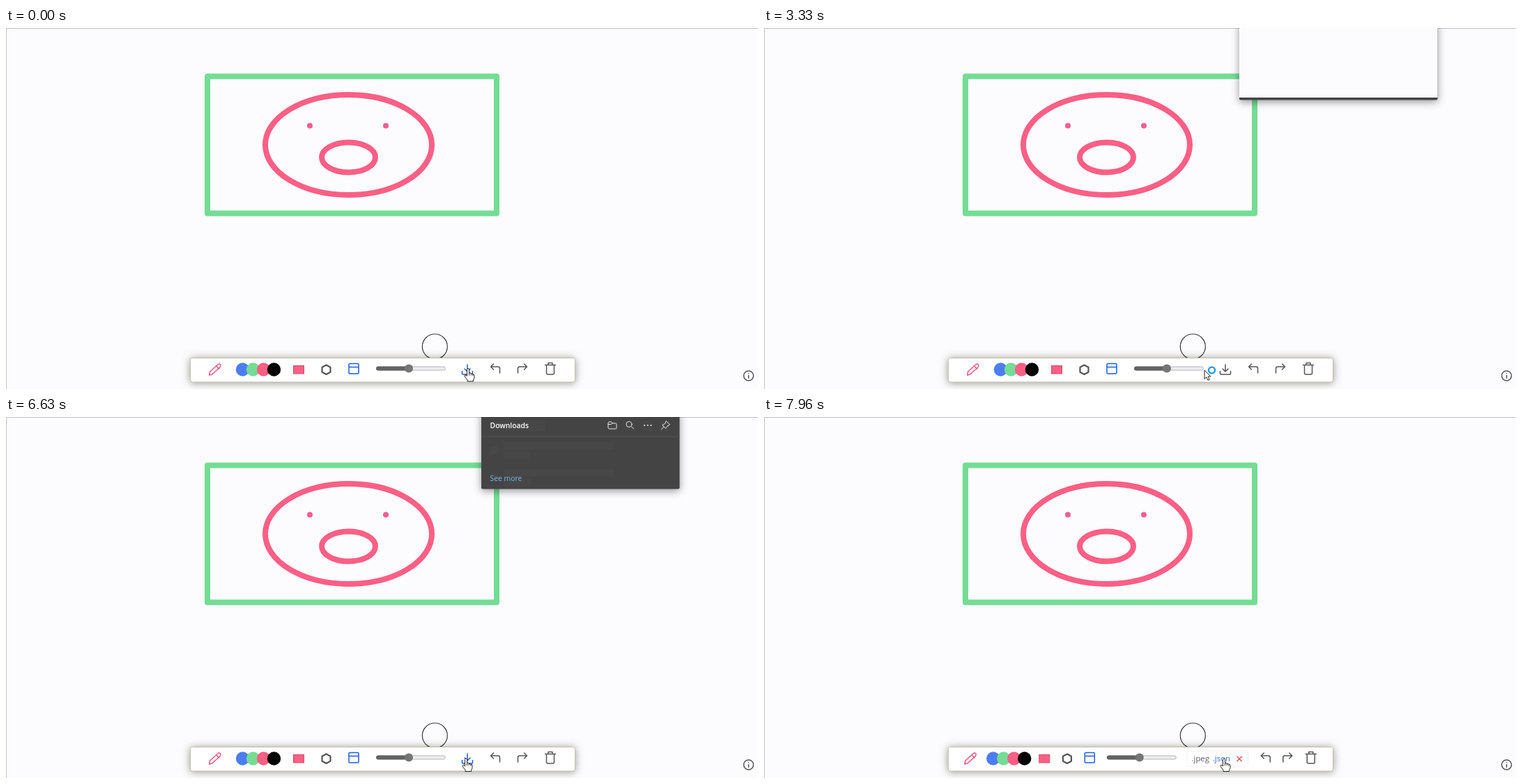
An HTML page that plays this animation: 1079x519 px, repeating every 8 s.

```html
<!DOCTYPE html>
<html lang="en">
<head>
<meta charset="utf-8">
<title>Drawing board export</title>
<style>
  html, body { margin: 0; width: 100%; height: 100%; overflow: hidden; background: #fcfcfe; }
  svg { display: block; font-family: "Open Sans", "Noto Sans", sans-serif; }
  .line { fill: none; stroke: #555; stroke-width: 1.5; stroke-linecap: round; stroke-linejoin: round; }
  .pink { stroke: #f4537c; }
  .blue { stroke: #1a5fe0; }
  .pale { stroke: #e8e8e8; stroke-width: 1; }
  .draw { fill: none; stroke: #fb5f85; stroke-width: 8; stroke-linejoin: round; }
  #bar { filter: drop-shadow(0 1px 6px rgba(50, 50, 30, .5)); }
  #sheet { filter: drop-shadow(0 3px 6px rgba(0, 0, 0, .4)); }
  .format { font-size: 12.2px; }
  .file { font-size: 9.1px; fill: #fff; }
  .open { font-size: 7.6px; fill: #76b9ed; }
</style>
</head>
<body>
<svg width="1079" height="519" viewBox="0 0 1079 519">
  <path d="M0 .5H1079" stroke="#bcbcd4"/>
  <path d="M.5 0V519" stroke="#c4c4bc"/>

  <rect class="draw" x="289" y="69.5" width="415" height="197" style="stroke:#74dc94"/>
  <ellipse class="draw" cx="491.5" cy="168" rx="119.5" ry="72"/>
  <ellipse class="draw" cx="491.5" cy="186" rx="38.5" ry="21.5"/>
  <g fill="#f45f90"><circle cx="436" cy="140.5" r="4"/><circle cx="545" cy="140.5" r="4"/></g>
  <circle cx="615.3" cy="458" r="18" fill="none" stroke="#3c3c46" stroke-width="1.2"/>
  <g class="line">
    <circle cx="1065.5" cy="500" r="7"/>
    <path d="M1065.5 499.5V503.5M1065.5 496.5V496.6"/>
  </g>

  <rect id="bar" x="264.5" y="474.5" width="552" height="34.5" rx="3" fill="#fff" stroke="#c2c2ae"/>
  <g id="tools">
    <path class="line pink" d="M-8 8L-7 3L4-7Q6-9 8-7Q9-5 7-3L-4 7ZM2-5L6-1"/>
    <g id="colors"></g>
    <rect x="-7.5" y="-5.5" width="15" height="11.5" fill="#fb5f85" stroke="#c9506d"/>
    <path class="line" style="stroke-width:2.2" d="M0-6.5L6-3.2V3.7L0 7L-6 3.7V-3.2Z"/>
    <path class="line blue" d="M-5.5-8.5H5.5Q7-8.5 7-7V4.5Q7 6 5.5 6H-5.5Q-7 6-7 4.5V-7Q-7-8.5-5.5-8.5ZM-7-3.5H7"/>
    <g>
      <rect x="-49.5" y="-4" width="99" height="5" rx="2.5" fill="#ededf0" stroke="#b6b6b6"/>
      <rect x="-50" y="-4.5" width="48" height="6" rx="3" fill="#626262"/>
      <circle cx="-3" cy="-1.5" r="6" fill="#757575"/>
    </g>
    <path class="line" d="M-2.5-8L-6.5-4L-2.5 0M-6.5-4H4Q6.5-4 6.5-1.5V5"/>
    <path class="line" d="M2.5-8L6.5-4L2.5 0M6.5-4H-4Q-6.5-4-6.5-1.5V5"/>
    <path class="line" d="M-7.5-6.5H7.5M-3-6.5V-9.5H3V-6.5M-5.5-6.5V5Q-5.5 7-3.5 7H3.5Q5.5 7 5.5 5V-6.5"/>
  </g>
  <path id="save" class="line" d="M-7.5 2.5V6Q-7.5 7-6.5 7H6.5Q7.5 7 7.5 6V2.5M0-7V3M-4-1L0 3L4-1"/>
  <g id="formats">
    <rect x="-47" y="-11.5" width="94" height="23.5" rx="3" fill="#fff" stroke="#f0f0f4"/>
    <text id="jpeg" class="format" x="-40" y="4">.jpeg</text>
    <text id="json" class="format" x="-7.5" y="4">.json</text>
    <path class="line" style="stroke:#e04444" d="M30-3L37 4M37-3L30 4"/>
  </g>

  <g id="panel">
    <rect id="sheet" x="682" y="-8" width="284.5" rx="2" fill="#444"/>
    <rect id="blank" x="682" y="0" width="284.5" height="100" fill="#fcfcfe"/>
    <g id="skeleton" fill="#575757"></g>
    <g id="header">
      <text x="694.5" y="15.7" font-size="10.4" font-weight="600" fill="#fff">Downloads</text>
      <path d="M682 28H966.5" stroke="#555"/>
      <g class="line pale">
        <path d="M864 8.5Q864 7 865.5 7H868.5L870 9H874.5Q876 9 876 10.5V15.5Q876 17 874.5 17H865.5Q864 17 864 15.5ZM864 10.5H868.5L870 9"/>
        <circle cx="894" cy="10.5" r="4"/><path d="M897 13.5L900.5 17"/>
        <path style="stroke-width:2" d="M916 12H916.1M920.7 12H920.8M925.4 12H925.5"/>
        <path d="M947.5 6L952.5 11L949 13L946.5 16.5L941.8 11.8L945.5 9.5ZM944 14.3L940.5 17.5"/>
      </g>
    </g>
    <g id="files"></g>
    <text id="more" x="694.5" font-size="10.4" fill="#76b9ed">See more</text>
  </g>

  <g id="hand">
    <path d="M-1.5 1Q-1.5-.5 0-.5Q1.5-.5 1.5 1V6Q3.8 4.8 4.2 7Q6.5 6 6.8 8Q9 7.4 9 9.5V12Q9 14.5 7.5 16V18H-1V16.2L-4.8 11Q-5.5 9.2-4 9Q-2.8 8.8-1.5 10.5Z" fill="#fff" stroke="#222" stroke-linejoin="round"/>
    <path d="M1.5 6V9.5M4.2 7V9.5M6.8 8V10" stroke="#222" fill="none"/>
  </g>
  <g id="arrow">
    <path d="M0 0V12.5L3-.2V10L5.2 14.5L7.3 13.5L5.3 9.3H9Z" fill="none"/>
    <path d="M0 0V12.5L2.9 9.8L5 14.5L7.2 13.5L5.2 9H9Z" fill="#fff" stroke="#222"/>
    <circle cx="10.5" cy="0" r="4.5" fill="#fff" stroke="#2a9fe0" stroke-width="2.6"/>
  </g>
</svg>
<script>
const el = Object.fromEntries([...document.querySelectorAll('[id]')].map(n => [n.id, n]));
const LOOP = 8000;
const lerp = (a, b, p) => a + (b - a) * p;
const ramp = (t, start, length) => Math.min(1, Math.max(0, (t - start) / length));
const show = (node, on) => node.setAttribute('visibility', on ? 'visible' : 'hidden');
const place = (node, x, y, scale = 1) =>
  node.setAttribute('transform', `translate(${x} ${y}) scale(${scale})`);
const mix = (a, b, p) => `rgb(${a.map((v, i) => Math.round(lerp(v, b[i], p)))})`;
const box = (x, y, w, h) => `<rect x="${x}" y="${y}" width="${w}" height="${h}"/>`;
const GREY = [85, 85, 85], BLUE = [26, 95, 210];

// CSS "ease" curve: bisect its x polynomial, then evaluate y.
function ease(x) {
  if (x <= 0 || x >= 1) return x <= 0 ? 0 : 1;
  let lo = 0, hi = 1;
  for (let i = 0; i < 20; i++) {
    const s = (lo + hi) / 2;
    if (.75 * s * (1 - s) + s ** 3 < x) lo = s; else hi = s;
  }
  const r = 1 - lo;
  return .3 * lo * r * r + 3 * lo * lo * r + lo ** 3;
}

el.colors.innerHTML = ['#4c7df5', '#74dc94', '#fb5f85', '#000'].map((c, i) =>
  `<circle cx="${i * 15 - 22.5}" cy="0" r="9.7" fill="${c}"/>`).join('');

el.skeleton.innerHTML = box(695, 6, 79, 14)
  + [864, 888.5, 913.5, 938].map(x => box(x, 6, 14, 14)).join('')
  + [0, 39].map(y => box(695, 42 + y, 12, 12) + box(714, 36 + y, 158, 11) + box(714, 50 + y, 39, 11)).join('');

el.files.innerHTML = ['untitled-slateboard (1).jpeg', 'slateBoard.json', 'untitled-slateboard.jpeg'].map((name, i) => {
  const icon = name.endsWith('json')
    ? '<path d="M697 39H703L705.5 41.5V51H697Z" fill="#f4f4f4"/>'
    : '<rect x="695" y="39" width="11.5" height="10.5" fill="#8a5a1c"/>';
  return `<g transform="translate(0 ${i * 38.7})">${icon}
    <text class="file" x="713" y="43">${name}</text>
    <text class="open" x="713" y="54.6">Open file</text>
    <path d="M713 57.5H745.5" stroke="#76b9ed" stroke-width=".8"/></g>`;
}).join('');

// Tool centres with the export menu closed and open.
const spots = [[299.7, 295.7], [362, 350.5], [420, 401], [459.5, 433.2], [499, 465],
  [581, 539], [702, 721], [741, 752], [781, 785]];

// Pointer path: time, x, y.
const path = [[0, 663, 490], [960, 663, 490], [1500, 661, 492], [1750, 661, 492],
  [2250, 632, 493], [2500, 632, 492], [3500, 632, 492], [4250, 660, 491.5], [LOOP, 660, 491.5]];

function pointer(t) {
  const i = path.findIndex(k => k[0] > t);
  const [a, b] = [path[i - 1], path[i]];
  const p = ramp(t, a[0], b[0] - a[0]);
  const s = p * p * (3 - 2 * p);
  return [lerp(a[1], b[1], s), lerp(a[2], b[2], s)];
}

function drawBar(t) {
  const open = t < 2630 ? ease(ramp(t, 130, 500))
    : t < 7620 ? 1 - ease(ramp(t, 2630, 500))
    : ease(ramp(t, 7620, 500));
  [...el.tools.children].forEach((tool, i) => place(tool, lerp(...spots[i], open), 491));
  const x = lerp(662, 650, open);
  show(el.save, open < .05);
  place(el.save, x, 491);
  el.save.style.stroke = mix(GREY, BLUE, t < 2630 ? .8 : ease(ramp(t, 4080, 250)));
  show(el.formats, open >= .05);
  place(el.formats, x, 491, open);
  el.formats.setAttribute('opacity', open);
  const onJson = t < 2630 ? 1 - ease(ramp(t, 2020, 400)) : t >= 7620 ? 1 : 0;
  const onJpeg = t < 2630 ? ease(ramp(t, 2020, 300)) : t < 7620 ? 1 : 0;
  el.json.style.fill = mix(GREY, BLUE, onJson);
  el.jpeg.style.fill = mix(GREY, BLUE, onJpeg);
}

function drawPanel(t) {
  const on = t >= 3240 && t < 7620, loaded = t >= 6630;
  const grow = ease(ramp(t, 7080, 250));
  el.panel.style.display = on ? '' : 'none';
  el.sheet.setAttribute('height', lerp(111.5, 182, grow));
  show(el.blank, t < 3500);
  show(el.skeleton, t >= 3500 && t < 6710);
  el.skeleton.setAttribute('opacity', loaded ? .2 : 1);
  show(el.header, loaded);
  place(el.header, 0, -2.5 * grow);
  show(el.more, loaded);
  el.more.setAttribute('y', lerp(91.8, 162, grow));
  el.files.setAttribute('opacity', grow);
}

function drawPointer(t) {
  const [x, y] = pointer(t), busy = t >= 2800 && t < 4080;
  show(el.hand, !busy);
  show(el.arrow, busy);
  place(el.hand, x, y);
  place(el.arrow, x, y);
}

function frame(now) {
  const t = now % LOOP;
  drawBar(t);
  drawPanel(t);
  drawPointer(t);
  requestAnimationFrame(frame);
}
frame(0);
</script>
</body>
</html>
```
